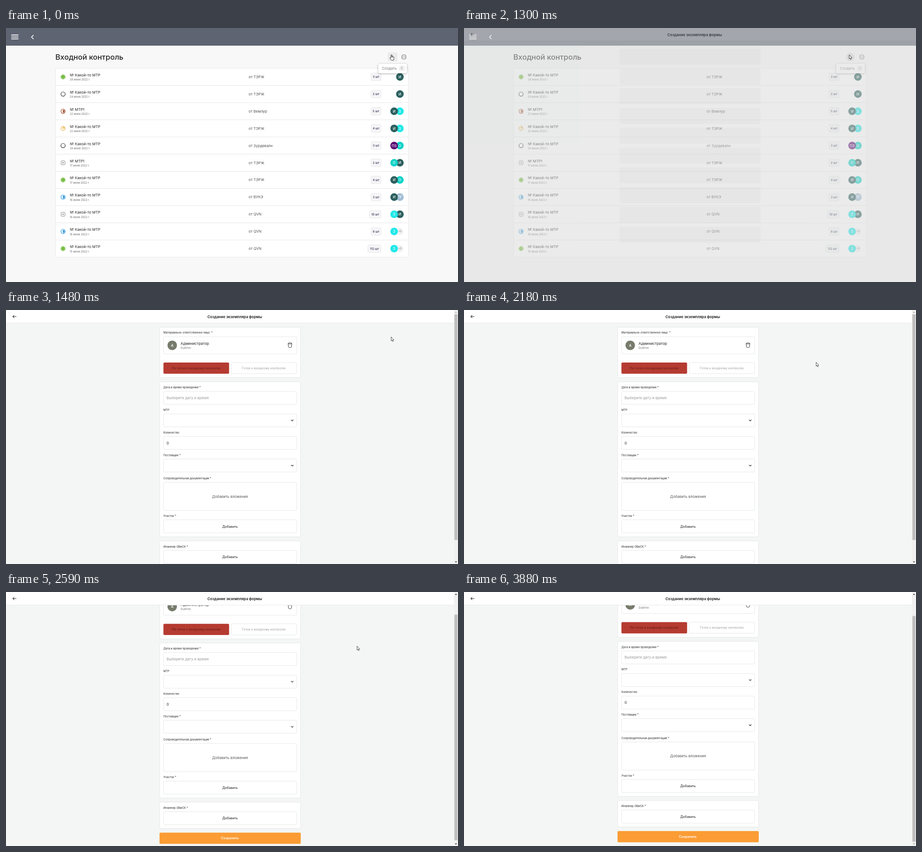
Write an HTML page that moves like this. It is 998x561 px and loops after 4110 ms.

```html
<!DOCTYPE html>
<html lang="ru">
<head>
<meta charset="utf-8">
<title>Входной контроль</title>
<style>
html, body { margin: 0; width: 100%; height: 100%; overflow: hidden; background: #f8f8f8; }
svg { display: block; width: 998px; height: 561px; font-family: Inter, "Open Sans", sans-serif; }
.anim { animation: 4110ms linear infinite; }
#dialog { animation-name: fade; }
#shade { animation-name: shade; }
#form { animation-name: load; animation-timing-function: step-end; }
#page { animation-name: scroll; }
#thumb { animation-name: thumb; }
#upArrow { animation-name: upArrow; }
#downArrow { animation-name: downArrow; }
#hover, #hand { animation-name: before; animation-timing-function: step-end; }
#ripple { animation-name: ripple; transform-origin: 853px 64px; }
#arrow { animation-name: show; animation-timing-function: step-end; }
#pointer { animation-name: move; }
@keyframes fade {
  0% { opacity: 0; }
  29.81% { opacity: 0; animation-timing-function: cubic-bezier(.4, 0, .2, 1); }
  35.28%, 100% { opacity: 1; }
}
@keyframes shade {
  0% { opacity: 0; }
  29.81% { opacity: 0; animation-timing-function: cubic-bezier(.4, 0, .2, 1); }
  35.28%, 100% { opacity: .25; }
}
@keyframes load { 0% { visibility: hidden; } 36.01%, 100% { visibility: visible; } }
@keyframes before { 0% { visibility: visible; } 30.17%, 100% { visibility: hidden; } }
@keyframes show {
  0% { visibility: hidden; }
  30.17% { visibility: visible; }
  94.4%, 100% { visibility: hidden; }
}
@keyframes ripple {
  0%, 23.84% { opacity: 0; transform: scale(.2); }
  27%, 100% { opacity: .1; transform: scale(1); }
}
@keyframes scroll {
  0% { transform: none; }
  58.15% { transform: translateY(0); animation-timing-function: cubic-bezier(.35, .1, .6, 1); }
  64.23%, 100% { transform: translateY(-49.4px); }
}
@keyframes thumb {
  0% { transform: none; }
  58.15% { transform: translateY(0); animation-timing-function: cubic-bezier(.35, .1, .6, 1); }
  64.23%, 100% { transform: translateY(-0px) translateY(43.5px); }
}
@keyframes upArrow { 0%, 58.6% { fill: #a3a3a3; } 58.64%, 100% { fill: #333; } }
@keyframes downArrow { 0%, 64.1% { fill: #333; } 64.23%, 100% { fill: #a3a3a3; } }
@keyframes move {
  0% { transform: translate(850px, 59px); }
  43.2% { transform: translate(850px, 59px); animation-timing-function: ease-in-out; }
  53.04% { transform: translate(777px, 115px); }
  62.5% { transform: translate(777px, 115px); }
  64.96% { transform: translate(766px, 133px); }
  69.4% { transform: translate(766px, 133px); animation-timing-function: ease-out; }
  74.45% { transform: translate(762px, 151px); }
  89.8% { transform: translate(762px, 151px); animation-timing-function: cubic-bezier(.45, .1, .7, .9); }
  94.2%, 100% { transform: translate(80px, 230px); }
}
</style>
</head>
<body>
<svg viewBox="0 0 998 561">
  <rect width="998" height="561" fill="#f8f8f8"/>
  <rect width="998" height="39" fill="#5e6472"/>
  <path d="M11.5 15.5h16M11.5 19.8h16M11.5 24.1h16" stroke="#fff" stroke-width="1.8"/>
  <path d="M60.8 15.6 56.3 20l4.5 4.4" fill="none" stroke="#fff" stroke-width="1.6"/>
  <g id="list"></g>
  <rect class="anim" id="hover" x="843" y="54" width="21" height="20" rx="3" fill="#ebebeb"/>
  <circle class="anim" id="ripple" cx="853" cy="64" r="9.5"/>
  <path d="M849 64.2h8M853 60.2v8" stroke="#333" stroke-width="1.1"/>
  <g id="tools"></g>
  <rect class="anim" id="shade" width="998" height="561"/>
  <g class="anim" id="dialog"></g>
  <g class="anim" id="form">
    <rect width="998" height="561" fill="#f4f6f5"/>
    <g class="anim" id="page"></g>
    <g id="bar"></g>
    <rect x="989" width="9" height="561" fill="#f1f1f1"/>
    <rect class="anim" id="thumb" x="990" y="9.5" width="7" height="498.5" fill="#bfbfbf"/>
    <path class="anim" id="upArrow" d="M991.2 6.3 993.5 3.6l2.3 2.7z"/>
    <path class="anim" id="downArrow" d="M991.2 555.2l2.3 2.7 2.3-2.7z"/>
  </g>
  <g class="anim" id="pointer">
    <path class="anim" id="arrow" d="M.5.5V9.2L2.4 7.5 3.8 10.5 5.1 9.9 3.8 7H6.3Z" fill="#fff" stroke="#222" stroke-width=".8"/>
  </g>
  <path class="anim" id="hand" d="M849.9 66.5v-6.3c0-1.4 1.8-1.4 1.8 0v3.4l4 .8c.9.2 1.2.8 1.1 1.6l-.6 3.2-.7 2h-4.3l-3.4-4.2c-.8-1.1.5-1.9 1.2-1.2z" fill="#fff" stroke="#222" stroke-width=".9"/>
</svg>
<script>
const $ = id => document.getElementById(id);

const text = (x, y, str, size, fill, more = '') =>
  `<text x="${x}" y="${y}" font-size="${size}" fill="${fill}" ${more}>${str}</text>`;
const mid = (x, y, str, size, fill, weight = 400) =>
  text(x, y, str, size, fill, `text-anchor="middle" font-weight="${weight}"`);
const box = (x, y, w, h, fill, stroke = 'none', r = 2.5) =>
  `<rect x="${x}" y="${y}" width="${w}" height="${h}" rx="${r}" fill="${fill}" stroke="${stroke}" stroke-width=".8"/>`;
const disc = (x, y, r, fill, stroke = 'none', width = 1) =>
  `<circle cx="${x}" cy="${y}" r="${r}" fill="${fill}" stroke="${stroke}" stroke-width="${width}"/>`;
const line = (d, stroke, width = 1) =>
  `<path d="${d}" fill="none" stroke="${stroke}" stroke-width="${width}"/>`;

// List of deliveries
const half = color => y => disc(126, y, 4.8, '#fff', color, 1.1) +
  `<path d="M126 ${y - 3.4}a3.4 3.4 0 0 1 0 6.8z" fill="${color}"/>` +
  disc(126, y, 3.3, color + '33');
const icons = {
  done: y => disc(126, y, 4.9, '#fff', '#79bd45') + disc(126, y, 4, '#79bd45'),
  open: y => disc(126, y, 4.7, '#fff', '#2b2b2b', 1.2),
  brown: half('#a5502f'),
  blue: half('#2d95dc'),
  early: y => disc(126, y, 4.8, '#fdf3da', '#e3ab45') +
    `<path d="M126 ${y}v-3.4a3.4 3.4 0 0 1 3.4 3.4z" fill="#e3ab45"/>`,
  stop: y => box(121.6, y - 4.4, 8.8, 8.8, '#fff', '#666', 2) +
    line(`M124.3 ${y - 1.7}l3.4 3.4m0-3.4l-3.4 3.4`, '#555', .9)
};
const tones = { 'И': '#2b605f', 'З': '#22e8e8', 'ПЗ': '#5b0b74', 'О': '#10d2c8', 'ПГ': '#a0bdd6' };
const avatar = (x, y, name) => name === '+3'
  ? disc(x, y, 7.6, '#f2f2f3') + mid(x + .3, y + 2, name, 5.6, '#666')
  : disc(x, y, 8.4, tones[name]) + mid(x, y + 2.8, name, 7.6, '#fff', 500);

const any = '№ Какой-то МТР', one = '№ МТР1';
const rows = [
  ['done', any, 28, 'ТЭРЖ', 3, 'И'],
  ['open', any, 24, 'ТЭРЖ', 2, 'И'],
  ['brown', one, 22, 'Вемлур', 5, 'З', 'И'],
  ['early', any, 22, 'ТЭРЖ', 4, 'З', 'И'],
  ['open', any, 20, 'Зурдевалн', 3, 'О', 'ПЗ'],
  ['stop', one, 17, 'ТЭРЖ', 2, 'И', 'О'],
  ['done', any, 17, 'ТЭРЖ', 4, 'О', 'И'],
  ['blue', any, 16, 'ВУКЭ', 3, 'ПГ', 'И'],
  ['stop', any, 16, 'QVN', 10, 'И', 'З'],
  ['blue', any, 16, 'QVN', 8, '+3', 'З'],
  ['done', any, 15, 'QVN', 112, '+3', 'З']
];
const row = ([icon, title, day, firm, count, right, left], i) => {
  const y = 108 + 37.93 * i;
  const w = 18.3 + 3.6 * String(count).length;
  return (i ? line(`M109 ${y - 19}h780`, '#e4e4e6', .9) : '') +
    icons[icon](y) +
    text(141, y - 1.1, title, 8.1, '#242424') +
    text(141, y + 8.3, `${day} июня 2022 г.`, 5.8, '#666') +
    text(535.8, y + 2.9, `от ${firm}`, 8, '#505050') +
    box(828 - w, y - 8.4, w, 16.8, '#f6f6f8', '#e3e3e6') +
    mid(828 - w / 2, y + 2.4, `${count} шт`, 6.6, '#2f3150', 500) +
    avatar(869.7, y, right) + (left ? avatar(857, y, left) : '');
};
$('list').innerHTML =
  text(109, 70, 'Входной контроль', 16.5, '#222', 'font-weight="500"') +
  box(109.4, 89, 779.2, 417, '#fff', '#e4e4e6', 3) +
  rows.map(row).join('');

$('tools').innerHTML =
  box(874, 59.6, 9, 8.8, 'none', '#333', 2.4) +
  [876.2, 878.5, 880.8].map(x => disc(x, 64, .65, '#333')).join('') +
  `<g style="filter:drop-shadow(0 1px 2px #0005)">${box(822, 79, 63, 21, '#fff')}</g>` +
  text(830, 92.4, 'Создать', 8.1, '#777') +
  box(868, 83.3, 12.4, 12, '#f0f0f0') +
  mid(874.2, 91.4, 'C', 5.8, '#777');

// Dialog with placeholders
const header = (w, cx) =>
  `<rect width="${w}" height="29.4" fill="#e6e8e7"/><rect width="${w}" height="28.4" fill="#fff"/>` +
  line('M23 14.5h-8m3.2-3.1L15 14.5l3.2 3.1', '#333', 1.1) +
  mid(cx, 17.5, 'Создание экземпляра формы', 8.05, '#1c1c1c', 600);
$('dialog').innerHTML =
  '<rect width="998" height="561" fill="#f4f6f5"/>' + header(998, 509.3) +
  Array.from({ length: 10 }, (_, i) => box(343, 45.5 + 43.7 * i, 312, 35.4, '#ebebeb', 'none', 5)).join('');
$('bar').innerHTML = header(989, 505);

// Form
const edge = '#dfe1e0';
const card = (y, h) => box(339.4, y, 311, h, '#fff', edge, 3);
const field = (y, h) => box(347.9, y, 294, h, '#fff', edge);
const label = (y, str) => text(347.6, y + 2.2, str, 6.05, '#262626');
const chevron = y => line(`M629.5 ${y - 1.3}l2.5 2.5 2.5-2.5`, '#333', 1.3);
const add = y => mid(494.6, y + 2.6, 'Добавить', 7.1, '#333', 500);

$('page').innerHTML =
  card(38, 111.5) +
  label(50, 'Материально-ответственное лицо\u00a0\u00a0*') +
  field(59, 38) +
  disc(367, 78, 10.5, '#767b6b') + mid(367, 80.9, 'А', 8, '#fff', 500) +
  text(385.6, 77, 'Администратор', 8.1, '#222') +
  text(385.6, 86.3, 'DulkFen', 6, '#777') +
  line('M622.9 73.8q0-1.2 4.1-1.2t4.1 1.2-4.1 1.2-4.1-1.2l.8 7.4q.2 1.6 1.8 1.6h3q1.6 0 1.8-1.6l.8-7.4', '#333', 1) +
  box(347.6, 116, 145, 24.8, '#b53b31') +
  mid(420.1, 130.8, 'Не готов к входному контролю', 7, '#6b211b', 500) +
  box(497, 116, 144.8, 24.6, '#fff', edge) +
  mid(569.2, 130.8, 'Готов к входному контролю', 7, '#adadad', 500) +
  card(158.5, 342.5) +
  label(170.8, 'Дата и время проведения *') + field(179.7, 28.7) +
  text(354.5, 196.9, 'Выберите дату и время', 8.05, '#9a9a9a') +
  label(220.6, 'МТР') + field(229.5, 28.7) + chevron(243.8) +
  label(270.6, 'Количество') + field(279.3, 28.7) +
  text(354.6, 296.6, '0', 8.2, '#222') +
  label(320.6, 'Поставщик *') + field(329.1, 28.7) + chevron(343.5) +
  label(371.8, 'Сопроводительная документация *') + field(380.5, 62.2) +
  mid(494.6, 414.6, 'Добавить вложения', 8, '#555') +
  label(455, 'Участок *') + field(463.5, 28.7) + add(478) +
  card(510, 58.4) +
  label(522.3, 'Инженер ОВиСК *') + field(531.1, 28.7) + add(545.5) +
  box(339, 577.3, 311.8, 24.8, '#fb9c34') +
  mid(494.4, 592.3, 'Сохранить', 7.25, '#fff', 600);
</script>
</body>
</html>
```
